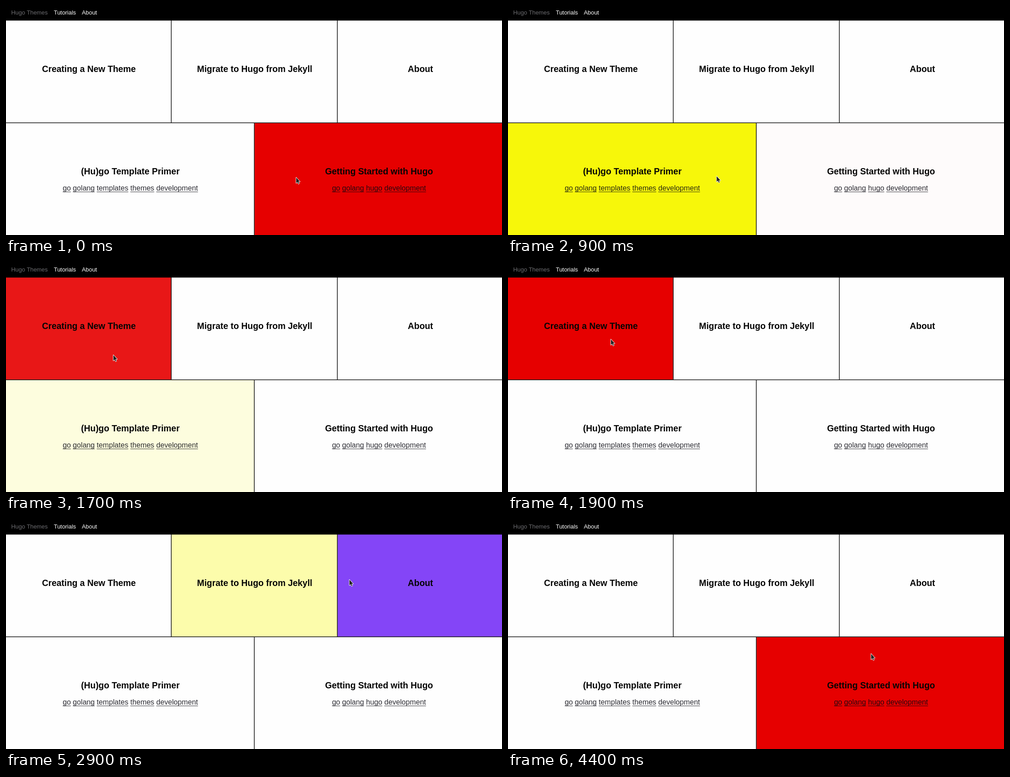
Recreate the animation shown at these times as an HTML page with a canvas. Size 1099 by 510 pixels, loop 4.5 s.

```html
<!DOCTYPE html>
<html lang="en">
<head>
<meta charset="utf-8">
<title>Hover grid</title>
<style>
  html, body { margin: 0; height: 100%; overflow: hidden; background: #fefefe; }
  canvas { display: block; }
</style>
</head>
<body>
<canvas id="stage" width="1099" height="510"></canvas>
<script>
const ctx = document.getElementById('stage').getContext('2d');
const W = 1099, H = 510, NAV_H = 32, SPLIT = 261, LINE = 1.6;
const GRID_W = W + 3; // the last column's border lies off stage
const LOOP = 4500, STEP = 100, FADE = 200, LAG = 12;
const FONT = '"Liberation Sans", Arial, sans-serif';
const TITLE = `bold 19.4px ${FONT}`, TAG = `16.15px ${FONT}`, NAV = `12.9px ${FONT}`;
const RED = '230,0,0', YELLOW = '247,247,10', VIOLET = '88,0,245';

const rows = [
  { top: NAV_H, bottom: SPLIT, baseline: 146.5, cells: [
    { title: 'Creating a New Theme', color: RED },
    { title: 'Migrate to Hugo from Jekyll', color: YELLOW },
    { title: 'About', color: VIOLET }
  ] },
  { top: SPLIT, bottom: H, baseline: 375, cells: [
    { title: '(Hu)go Template Primer', color: YELLOW, tags: 'go golang templates themes development' },
    { title: 'Getting Started with Hugo', color: RED, tags: 'go golang hugo development' }
  ] }
];
const [[theme, migrate, about], [primer, started]] = rows.map(row => row.cells);

// Hovered cells in order, with the time the pointer enters each
const visits = [[started, -FADE], [primer, 710], [theme, 1560], [migrate, 2130],
  [about, 2805], [started, 3710], [null, LOOP + FADE]];

// Pointer path: time, x, y, rest before moving on
const path = [
  [0, 643, 382], [200, 592, 389, 400], [700, 540, 388], [1200, 346, 366],
  [1400, 269, 322, 100], [1700, 238, 205, 100], [1900, 228, 170],
  [2800, 690, 136], [2900, 761, 133], [3000, 889, 148], [3200, 943, 180],
  [3600, 889, 242], [3700, 861, 264], [4100, 807, 293, 100], [4400, 804.5, 298]
];
const arrow = new Path2D('M0 0V12.4L2.8 9.9L4.8 14.2L6.6 13.4L4.6 9.2H8.4Z');

const ease = p => 1 - (1 - Math.min(1, Math.max(0, p))) ** 2;

function hoverLevel(cell, t) {
  let level = 0;
  visits.forEach(([visited, enter], i) => {
    if (visited !== cell) return;
    const leave = visits[i + 1][1] + LAG;
    level += ease((t - enter) / FADE) - ease((t - leave) / FADE);
  });
  return level;
}

function pointerAt(t) {
  const next = path.findIndex(key => key[0] > t);
  if (next < 0) return path.at(-1).slice(1, 3);
  const [t0, x0, y0, rest = 0] = path[next - 1], [t1, x1, y1] = path[next];
  const k = Math.max(0, (t - t0 - rest) / (t1 - t0 - rest));
  return [x0 + (x1 - x0) * k, y0 + (y1 - y0) * k];
}

function rect(color, x, y, w, h) {
  ctx.fillStyle = color;
  ctx.fillRect(x, y, w, h);
}

function text(str, x, y, font, color, align = 'left') {
  ctx.font = font;
  ctx.fillStyle = color;
  ctx.textAlign = align;
  ctx.fillText(str, x, y);
}

function drawTags(tags, mid) {
  const ink = 'rgba(8,8,16,.85)';
  ctx.font = TAG;
  const gap = ctx.measureText(' ').width;
  let x = mid - ctx.measureText(tags).width / 2;
  for (const tag of tags.split(' ')) {
    const width = ctx.measureText(tag).width;
    text(tag, x, 410.5, TAG, ink);
    rect(ink, x, 413.5, width, 1);
    x += width + gap;
  }
}

function drawRow({ top, bottom, baseline, cells }, t) {
  const pitch = GRID_W / cells.length;
  cells.forEach((cell, i) => {
    const left = Math.round(i * pitch), right = Math.round((i + 1) * pitch);
    const mid = (i + 0.5) * pitch;
    rect(`rgba(${cell.color},${hoverLevel(cell, t)})`, left, top, right - left, bottom - top);
    rect('#222', right - LINE, top, LINE, bottom - top);
    text(cell.title, mid, baseline, TITLE, '#050505', 'center');
    if (cell.tags) drawTags(cell.tags, mid);
  });
}

function drawPointer(x, y) {
  ctx.save();
  ctx.translate(x, y);
  ctx.lineJoin = 'round';
  ctx.lineWidth = 1.7;
  ctx.strokeStyle = '#fff';
  ctx.stroke(arrow);
  ctx.fillStyle = '#222';
  ctx.fill(arrow);
  ctx.restore();
}

function draw(now) {
  const t = Math.floor(now % LOOP / STEP) * STEP;
  rect('#fefefe', 0, 0, W, H);
  rows.forEach(row => drawRow(row, t));
  rect('#222', 0, SPLIT - LINE, W, LINE);
  rect('#000', 0, 0, W, NAV_H + 0.4);
  text('Hugo Themes', 11.5, 19, NAV, '#6c6c70');
  text('Tutorials', 106, 19, NAV, '#fff');
  text('About', 168, 19, NAV, '#fff');
  drawPointer(...pointerAt(t));
}

let start;
function tick(now) {
  start ??= now;
  draw(now - start);
  requestAnimationFrame(tick);
}
requestAnimationFrame(tick);
</script>
</body>
</html>
```
